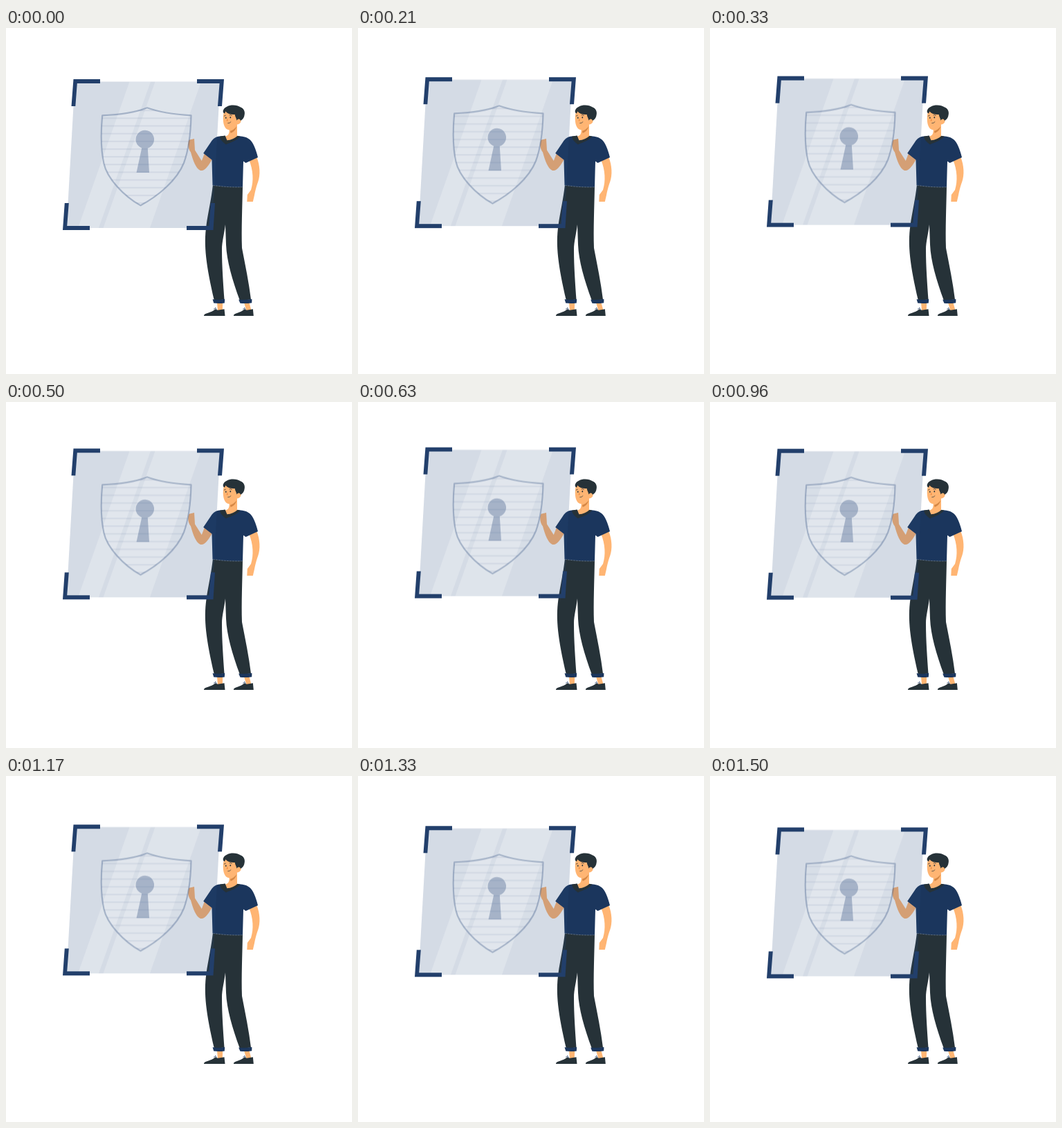
Write an HTML page that moves like this. It is 500 by 500 pixels and loops after 1.54 s.

```html
<!DOCTYPE html>
<html lang="en">
<head>
<meta charset="utf-8">
<title>Security panel</title>
<style>
  html, body { margin: 0; width: 100%; height: 100%; overflow: hidden; background: #fff; }
  svg { display: block; width: 100%; height: 100%; }
  .skin { fill: #ffb573; }
  .dark { fill: #263238; }
  .navy { fill: #1b365d; }
  .line { fill: none; stroke: #263238; stroke-linecap: round; }
  .tint { fill: #2b4a7c; }
  .panel { animation: float 1540ms linear infinite; }
  @keyframes float {
    0% { transform: translateY(0); }
    46.1% { transform: translateY(-9.5px); }
    97.4%, 100% { transform: translateY(.4px); }
  }
</style>
</head>
<body>
<svg viewBox="0 0 500 500">
  <defs>
    <path id="shield" d="M204 115.3C188 121.5 164 125.5 139.2 126.3C137 150 137.5 178 141.5 196C146 217 170 243 194.3 256.4C220 243 247 220 257 195C264 176 267 150 267.5 126.3C243 125 221 121.5 204 115.3Z"/>
    <clipPath id="inside"><use href="#shield"/></clipPath>
    <pattern id="rules" y="129.4" width="20" height="11.15" patternUnits="userSpaceOnUse">
      <rect width="20" height="2" fill="#2b4a7c" opacity=".085"/>
    </pattern>
    <g id="shoe">
      <path class="dark" d="M286 415.5C286.5 411.5 296 412.5 302.5 406.3L306 407.8L315.5 406.3L316.5 416H286Z"/>
      <path d="M300 406.5L303 404.6L304.5 407.5M303 404.6L302 403.8" fill="none" stroke="#34507a" stroke-width=".8"/>
    </g>
  </defs>

  <g>
    <path class="skin" d="M305 397H313.2L312.8 408H306ZM344 397H351.5L354.3 407.5L347.5 408.5Z"/>
    <use href="#shoe"/>
    <use href="#shoe" transform="translate(58.4) scale(.946 1)"/>
    <path class="dark" d="M299 226C297 246 292 267 289.5 285C285.5 314 289 343 301 394L315.5 392.5C314 370 312 345 312 320C312 309 315.5 297 317 284L318 313C319 337 327 364 338 394L354 392.5C351 368 346 344 341 318C340 291 341.5 258 342 229Z"/>
    <path class="navy" d="M298.6 392Q307 393.5 316.2 391.8L315.8 397.4Q308 398.6 300.2 397.6ZM336.2 392.4Q346 393.5 355.4 391.8L355.2 397.2Q347 398.6 338.4 397.8Z"/>
    <path class="skin" d="M287 181L282.8 192L273 176.5L272 160L264.5 161.8C262 168 263.5 175 267 179.5C270 191 274.5 203 280.5 205.8C287.5 208 293 198 298.5 189Z"/>
    <path class="skin" d="M351 190L362 186C367.5 199 367.5 213 364.3 222C361 231 360 237 359 241.5L356.8 251H348.3L348.8 241L354 234C358 221 357.5 206 351 190Z"/>
    <path class="skin" d="M322.5 144L334 139V157.5C331 161.5 323 165 317.5 162.5L316.5 156.5C321 156 323.5 153 322.5 144Z"/>
    <path class="navy" d="M309 156.6C303 156.8 299.5 160 296 165L285.2 181L297.5 190.5L298.5 227.2Q320 230.5 342 229.8L343 192.5L346.5 195L364 187C361 175 357 165 352 161C347 157 341 156.5 335 156C331 160 325 163.5 319 163L316.5 155.8Z"/>
    <path class="dark" d="M309 156.7L316.6 155.5L319.4 162.3C325 162 331 159.5 334.5 155.8L338.5 156.8C334 162 325 165.5 318 168.2C313 165 309.7 161 309 156.7Z"/>
    <path d="M299 227.3Q320 230.5 341.5 229.8" fill="none" stroke="#71839a" stroke-width=".7" stroke-dasharray="3 1"/>
    <path d="M324 149Q330 147 333.3 142Q332 149 324.7 152Z" fill="#d58745"/>

    <path class="skin" d="M315.5 119C313 127 313.2 137 316 142.5C318.5 147.8 324.5 149 329 145.3L333.7 139.5C338 139.5 340.5 135.5 339.5 132L334 119Z"/>
    <path class="dark" d="M316.2 123.5C312 123 313 116 319.5 113.5C325.5 110 335 111.5 338.5 114.2C343.5 115.5 346 121 344.5 126C344 130 341.5 133 338.8 133.8C338 130.7 335 130.5 333.5 133.8C333 130.5 331 128 330.7 125C325.5 125.5 320 124 317.2 120.5Z"/>
    <ellipse class="dark" cx="317.8" cy="129.8" rx=".8" ry="1.25"/>
    <ellipse class="dark" cx="324.3" cy="129.3" rx=".8" ry="1.25"/>
    <path class="line" stroke-width=".7" d="M315.2 127.2L317.4 126.2M323 125.8Q325 125.1 326.5 126.5M320.7 137.5Q323.5 138 325 135.7"/>
    <path d="M320.2 130L318.6 134.3L320.5 134.4Z" fill="#ed893e"/>
  </g>

  <g class="panel">
    <path class="tint" opacity=".2" d="M99.5 77.5H309.5L298 289H87.5Z"/>
    <path fill="#fff" opacity=".23" d="M178.5 77.5H209L134 289H104ZM215.5 77.5H282L208 289H140.5Z"/>
    <use href="#shield" fill="#fff" opacity=".08"/>
    <rect x="135" y="114" width="135" height="144" fill="url(#rules)" clip-path="url(#inside)"/>
    <g opacity=".32">
      <use href="#shield" fill="none" stroke="#2b4a7c" stroke-width="2.2" stroke-linejoin="round"/>
      <path class="tint" d="M196.2 173.5A13.3 13.3 0 1 1 204.8 173.7L207 209H188.5Z"/>
    </g>
    <path fill="#223f6b" d="M97.5 74H136V80H102.8L100.3 113H94.5ZM276 74H315L312 113H306L308.6 80H276ZM84.8 253H90.8L88.2 286H121V292H82ZM296 253H302L299.5 292H261V286H293.5Z"/>
  </g>
</svg>
</body>
</html>
```
